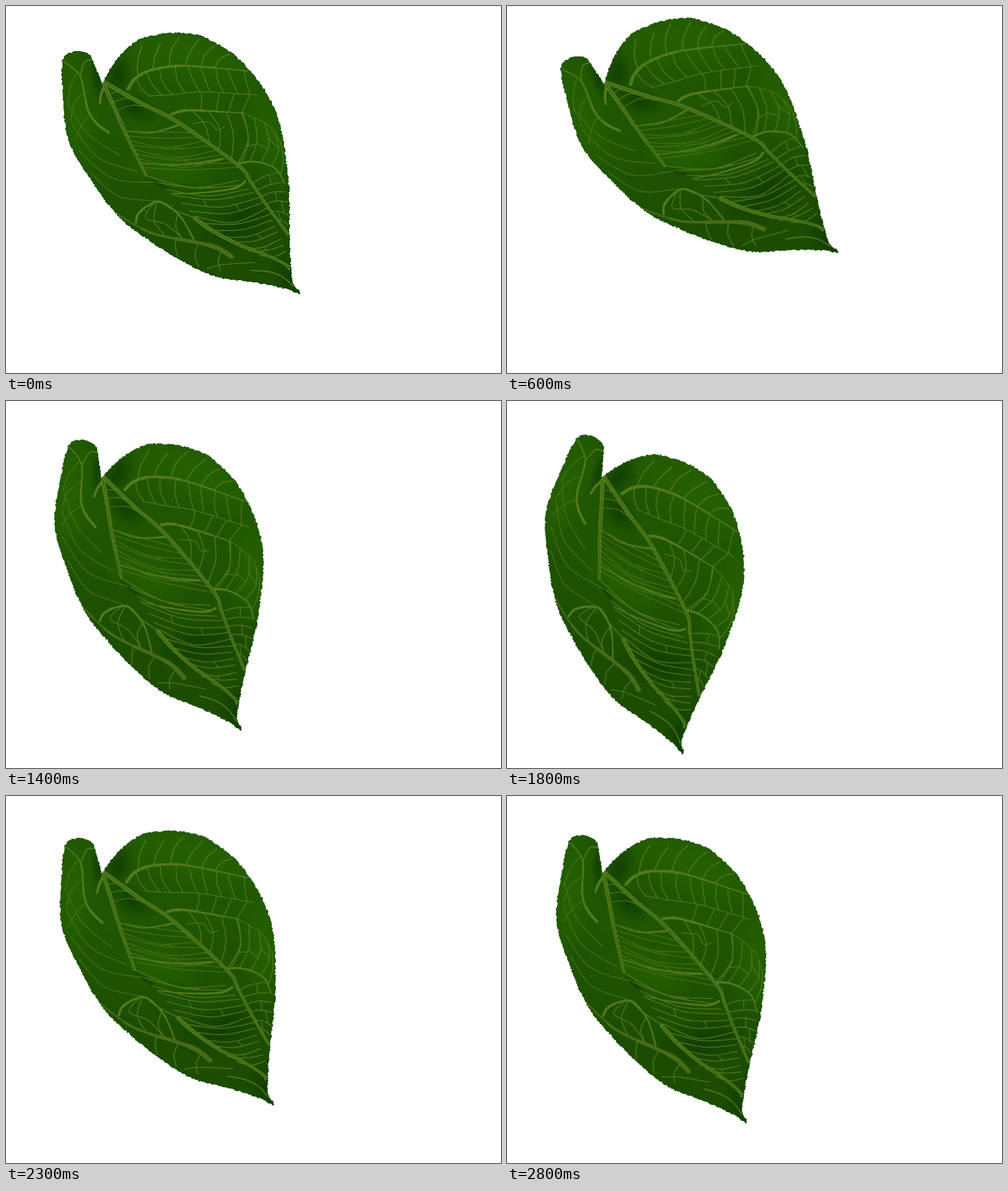
Recreate the animation shown at these times as an HTML page. Size 869 px wide and 644 px high, loop 3 s.

```html
<!DOCTYPE html>
<html lang="en">
<head>
<meta charset="utf-8">
<title>Leaf</title>
<style>
  html, body { margin: 0; width: 100%; height: 100%; overflow: hidden; background: #fff; }
  svg { display: block; width: 869px; height: 644px; }
  #leaf { transform-origin: 173px 129px; animation: sway 3s -4ms infinite; }
  #veins path { fill: none; stroke-linecap: round; stroke-linejoin: round; }
  @keyframes sway {
    0% { transform: rotate(0deg); animation-timing-function: steps(6); }
    20% { transform: rotate(-11deg); animation-timing-function: steps(12); }
    60% { transform: rotate(26.9deg); animation-timing-function: steps(6); }
    80% { transform: rotate(2.66deg); animation-timing-function: steps(4); }
    93.3333%, 100% { transform: rotate(13.3deg); }
  }
</style>
</head>
<body>
<svg viewBox="0 0 869 644">
  <defs>
    <radialGradient id="dark">
      <stop offset="0" stop-color="#0a3600" stop-opacity=".7"/>
      <stop offset=".5" stop-color="#0a3600" stop-opacity=".35"/>
      <stop offset="1" stop-color="#0a3600" stop-opacity="0"/>
    </radialGradient>
    <radialGradient id="light">
      <stop offset="0" stop-color="#266300" stop-opacity=".8"/>
      <stop offset=".5" stop-color="#266300" stop-opacity=".5"/>
      <stop offset="1" stop-color="#266300" stop-opacity="0"/>
    </radialGradient>
    <linearGradient id="green" x1=".5" y1="0" x2=".7" y2="1">
      <stop offset=".3" stop-color="#205601"/>
      <stop offset=".8" stop-color="#1b4c01"/>
    </linearGradient>
    <clipPath id="inside"><path id="edge"/></clipPath>
  </defs>
  <g id="leaf">
    <path id="body" fill="url(#green)" shape-rendering="crispEdges"/>
    <g clip-path="url(#inside)">
      <g id="shade"></g>
      <g id="veins"></g>
    </g>
  </g>
</svg>
<script>
const $ = id => document.getElementById(id);
const mix = (a, b, f) => a + (b - a) * f;

let seed = 7;
const rand = () => (seed = seed * 16807 % 2147483647) / 2147483647;
const jitter = size => (rand() - .5) * size;

function make(tag, attrs, parent) {
  const el = document.createElementNS('http://www.w3.org/2000/svg', tag);
  for (const k in attrs) el.setAttribute(k, attrs[k]);
  if (parent) parent.append(el);
  return el;
}

// Smooth curve through "x,y x,y ..." points
function curve(text) {
  const p = text.trim().split(/\s+/).map(s => s.split(',').map(Number));
  let d = 'M' + p[0];
  for (let i = 0; i < p.length - 1; i++) {
    const a = p[i], b = p[i + 1], pre = p[i - 1] || a, post = p[i + 2] || b;
    const c1 = a.map((v, k) => v + (b[k] - pre[k]) / 6);
    const c2 = b.map((v, k) => v - (post[k] - a[k]) / 6);
    d += `C${c1} ${c2} ${b}`;
  }
  return make('path', { d });
}

function at(path, f) {
  const { x, y } = path.getPointAtLength(path.getTotalLength() * f);
  return [x, y];
}

function ragged(path, step, size) {
  const n = Math.round(path.getTotalLength() / step), pts = [];
  for (let i = 0; i < n; i++) pts.push(at(path, i / n).map(v => (v + jitter(size)).toFixed(1)));
  return 'M' + pts.join('L') + 'Z';
}

const outline = ragged(curve(`169,136 157,108 147,86 127,79 109,84 99,98 100,165 106,220 121,261
  160,322 187,358 222,391 292,438 365,474 430,484 490,496 512,505 516,501 506,490 501,470
  498,395 497,320 489,250 482,213 471,179 452,144 429,114 403,88 374,68 338,51 292,47 240,56
  218,70 192,97 169,136`), 2.2, 2.6);
$('edge').setAttribute('d', outline);
$('body').setAttribute('d', outline);

function blot(kind, cx, cy, rx, ry, turn = 0) {
  make('ellipse', { cx, cy, rx, ry, fill: `url(#${kind})`, transform: `rotate(${turn} ${cx} ${cy})` }, $('shade'));
}
blot('light', 325, 85, 165, 60, 8);
blot('light', 122, 180, 40, 120, -8);
blot('light', 290, 285, 85, 45, 10);
blot('light', 465, 225, 45, 110, -10);
blot('dark', 196, 122, 26, 48, 12);
blot('dark', 225, 178, 50, 28, 25);
blot('dark', 160, 128, 12, 45, -10);
blot('dark', 410, 380, 85, 45, -25);
blot('dark', 505, 480, 35, 60, -25);
blot('dark', 270, 314, 34, 6, 25);

const fine = '#507819', soft = '#476f14', bold = '#527a1c', olive = '#496b17', gap = '#2f5c0a';

// Draws the first part of a path
function ink(path, width, stroke, part = 1) {
  const line = make('path', { d: path.getAttribute('d'), 'stroke-width': width, stroke }, $('veins'));
  if (part < 1) line.setAttribute('stroke-dasharray', `${path.getTotalLength() * part} 9999`);
}

// Vein that gets thinner away from its root
function taper(path, from, to, stroke = bold) {
  for (const f of [0, .33, .67, 1]) ink(path, mix(to, from, f), stroke, mix(1, .2, f));
}

// Small veins from span s of path a to span t of path b, some tied to the one before
function rungs(a, s, b, t, n, { bend = .08, tie = 0, width = 1.6, color = fine, loose = .3 } = {}) {
  let last;
  for (let i = 0; i < n; i++) {
    const f = n > 1 ? i / (n - 1) : 0;
    const near = span => Math.min(1, Math.max(0, mix(...span, f) + jitter(loose) * (span[1] - span[0]) / n));
    const [x1, y1] = at(a, near(s)), [x2, y2] = at(b, near(t));
    const k = bend + jitter(.1);
    const knee = [(x1 + x2) / 2 - (y2 - y1) * k, (y1 + y2) / 2 + (x2 - x1) * k];
    const path = curve(`${x1},${y1} ${knee} ${x2},${y2}`);
    ink(path, width, color);
    if (last && rand() < tie) {
      const g = mix(.3, .7, rand());
      ink(curve(`${at(last, g)} ${at(path, g + jitter(.2))}`), width * .9, color);
    }
    last = path;
  }
}

// Ribs
const mid = curve('174,135 240,172 302,204 407,279 430,309 458,350 495,400');
const side = curve('173,140 190,178 212,228 246,297');
const low = curve('332,373 365,396 410,419 455,436 490,453 497,461');
const top1 = curve('214,146 225,129 245,116 275,108 320,105 425,114');
const top2 = curve('291,190 305,185 330,183 416,188');
const top3 = curve('406,277 430,273 455,277 475,287 490,312');
const lobe = curve('180,222 158,205 143,180 130,123 101,97');
const keel = curve('396,440 370,424 335,415 255,398 187,360');
const arch = curve('228,380 232,365 250,350 272,344 305,368 330,410');

// Guides where the small veins meet or end
const crown = curve('235,70 268,66 322,54 397,86');
const net = curve('250,158 287,156 345,151 440,156');
const link = curve('328,207 356,203 370,217 384,212');
const outer = curve('416,188 445,200 465,213 482,239');
const rim = curve('480,290 495,345 495,385');
const fold = curve('250,299 290,329 330,367 390,412 450,440');
const shelf = curve('408,306 418,315 458,347 470,382 492,430');
const left = curve('108,170 125,245 148,292');
const crease = curve('200,262 220,284 262,311 260,345');
const base = curve('302,440 345,460 406,470');

rungs(top1, [.14, .74], crown, [0, 1], 6, { bend: -.1, width: 1.9 });
rungs(top1, [.1, .96], net, [0, .94], 9, { bend: .06 });
ink(net, 1.5, fine);
rungs(net, [.5, .95], top2, [.42, 1], 4, { bend: -.02 });
rungs(top2, [.3, 1], mid, [.5, .66], 4, { bend: -.12 });
ink(link, 1.5, fine);
ink(outer, 1.6, soft);
rungs(outer, [0, 1], top3, [0, .85], 5, { bend: -.12, tie: .7 });
rungs(mid, [.74, .92], rim, [0, 1], 6, { bend: -.08, tie: .5 });
rungs(side, [.1, .28], mid, [.1, .22], 3, { bend: -.15, color: soft });
rungs(side, [.5, .92], mid, [.42, .66], 9, { bend: .05, tie: .6, color: soft });
rungs(fold, [0, .97], shelf, [0, 1], 14, { bend: .1, tie: .6 });
rungs(left, [0, 1], crease, [0, 1], 4, { bend: .12, color: soft });
rungs(lobe, [.3, .8], left, [.5, 0], 3, { bend: .1, color: soft });
rungs(arch, [.35, .9], keel, [.55, .25], 3, { bend: .2 });
rungs(keel, [.1, .45], base, [.7, 0], 3, { bend: .1 });

ink(curve('150,95 138,98 130,123'), 2, bold);
ink(curve('430,464 460,466 485,475 505,492'), 2, bold);
ink(curve('353,461 380,454 437,450'), 1.5, fine);
ink(curve('272,344 295,358 335,373'), 1.8, bold);
ink(curve('260,345 245,372 280,383 315,412'), 1.5, fine);

taper(top1, 5.5, 2);
taper(top2, 5, 2);
taper(top3, 3.5, 2);
taper(lobe, 4.5, 2);
taper(arch, 4, 2.6);
taper(keel, 8, 2.5, olive);
taper(curve('173,141 167,155 165,171'), 5, 4);
taper(curve('310,206 285,215 250,223 210,219'), 3, 1.6);
taper(curve('380,268 340,275 290,279 235,275'), 3.5, 1.6);
taper(curve('420,308 400,320 340,328 290,329'), 4, 1.8);

// Main ribs are broad bands split by a dark line
for (const rib of [mid, side, low]) {
  taper(rib, 7, 5);
  ink(rib, 1.2, gap);
}
</script>
</body>
</html>
```
